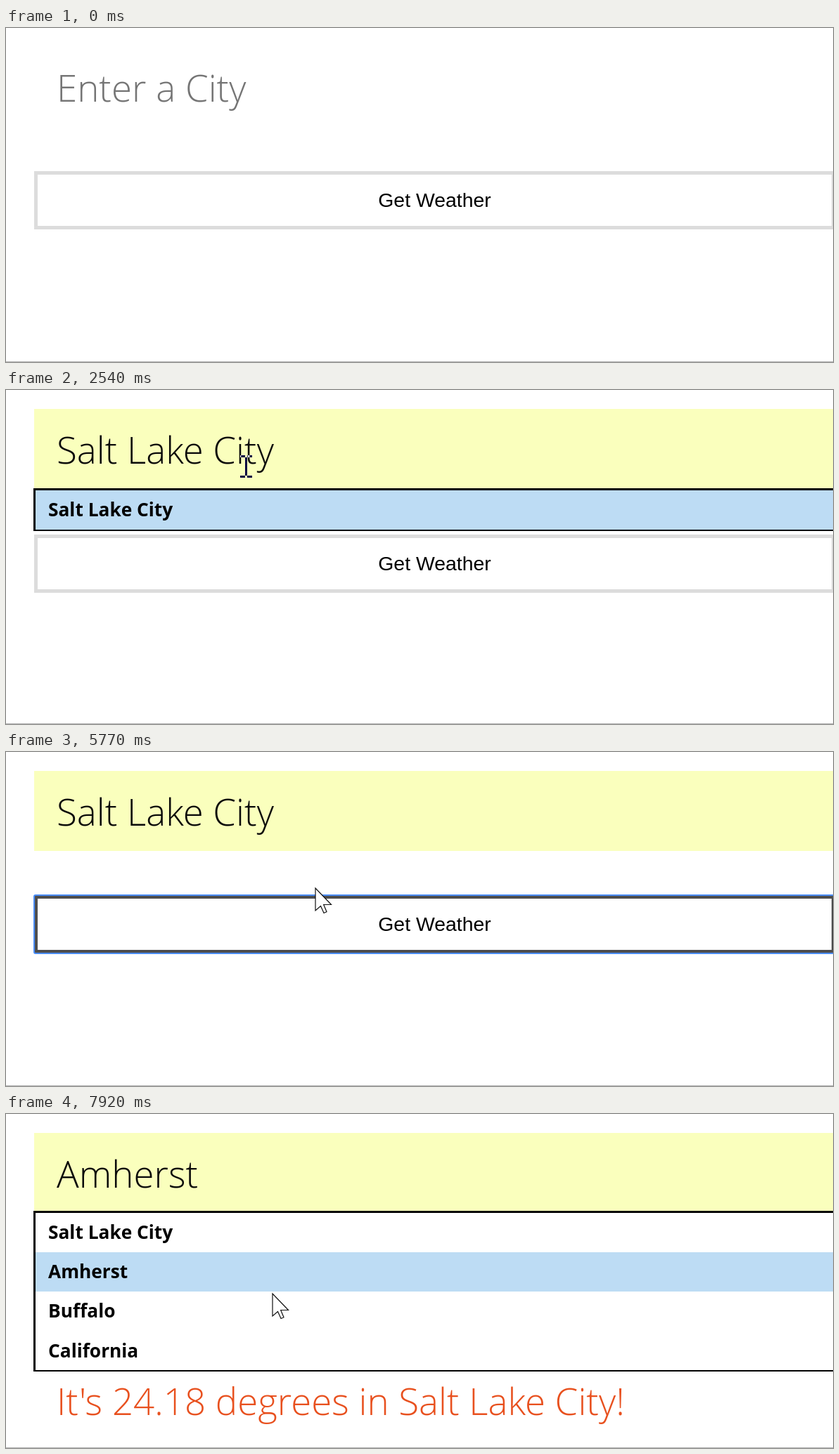
An HTML page for the animation above (7990 ms loop, 1176 px wide and 476 px high).

```html
<!DOCTYPE html>
<html lang="en">
<head>
<meta charset="utf-8">
<title>City weather form</title>
<style>
  html, body { margin: 0; width: 100%; height: 100%; overflow: hidden; background: #fff; }
  svg { display: block; isolation: isolate; }
  .large { font: 300 52.8px "Open Sans", sans-serif; }
  .row { font: 700 26.3px "Noto Sans", "Open Sans", sans-serif; }
  .label { font: 28.4px "Liberation Sans", Arial, sans-serif; text-anchor: middle; }
  #beam { fill: #fff; mix-blend-mode: difference; }
  #halo { fill: #fffd84; mix-blend-mode: multiply; }
</style>
</head>
<body>
<svg width="1176" height="476" viewBox="0 0 1176 476">
  <rect width="1176" height="476" fill="#fff"/>
  <rect y="475" width="1176" height="1" fill="#b4b4b4"/>
  <rect id="fill" x="40" y="27" width="1136" height="114" fill="#faffbd"/>
  <rect id="underline" x="40" y="141" width="1136" height="1.5" fill="#d4d4cc"/>
  <text id="field" class="large" x="72" y="105"></text>
  <rect id="caret" y="49" width="2" height="71" fill="#4b505c"/>
  <g id="button">
    <rect id="frame" x="42.5" y="206.5" width="1134" height="78" fill="#fff" stroke-width="5"/>
    <rect id="ring" x="40" y="204" width="1140" height="83" rx="2" fill="none" stroke="#4a8df8" stroke-width="2"/>
    <text class="label" x="609.5" y="255">Get Weather</text>
  </g>
  <text id="result" class="large" x="72" y="429" fill="#e8501e">It's 24.18 degrees in Salt Lake City!</text>
  <g id="list">
    <rect id="border" x="39" y="138" width="1137"/>
    <rect id="panel" x="42" y="141" width="1134" fill="#fff"/>
    <rect id="hover" x="42" width="1134" height="56" fill="#bddcf4"/>
    <g id="rows"></g>
  </g>
  <path id="arrow" d="M0 0V32L7.5 25.5L12 35.5L16 33.7L11.7 23.5H22.5Z" fill="#fff" stroke="#111" stroke-width="1.2"/>
  <path id="beam" d="M-5-14h7v3h-7zM5-14h7v3h-7zM2-11h3v26h-3zM-5 15h7v3h-7zM5 15h7v3h-7z"/>
  <circle id="halo" r="28"/>
</svg>
<script>
const LOOP = 7990;
const cities = ["Salt Lake City", "Amherst", "Buffalo", "California"];
const $ = id => document.getElementById(id);
const within = (t, a, b) => t >= a && t < b;
const show = (id, on) => $(id).style.display = on ? "" : "none";
const place = (id, x, y) => $(id).setAttribute("transform", `translate(${x} ${y})`);

// Pointer moves: start, last step, number of steps, destination
const moves = [
  [120, 750, 9, 338, 107],
  [4330, 4570, 4, 453, 228],
  [5450, 5520, 2, 448, 215],
  [5770, 5770, 1, 440, 194],
  [5840, 6450, 9, 385, 127],
  [7210, 7460, 4, 380, 212],
  [7690, 7920, 4, 379, 256]
];

function pointer(t) {
  let x = 425, y = 500;
  for (const [start, end, steps, toX, toY] of moves) {
    if (t < start) break;
    const done = steps < 2 ? 1 : Math.floor((t - start) / (end - start) * (steps - 1) + .001) + 1;
    const p = Math.min(1, done / steps);
    x += (toX - x) * p;
    y += (toY - y) * p;
  }
  return [Math.round(x), Math.round(y)];
}

// Field contents: start, text, kind
const contents = [
  [0, "Enter a City", "empty"],
  [1680, "S", "typed"],
  [1830, "Sa", "typed"],
  [2000, "Sal", "typed"],
  [2470, cities[0], "filled"],
  [5920, "Enter a City", "empty"],
  [7290, cities[0], "filled"],
  [7690, cities[1], "filled"]
];
const inks = { empty: "#757575", typed: "#4b505c", filled: "#0a0a0a" };

cities.forEach((city, i) => {
  const row = document.createElementNS("http://www.w3.org/2000/svg", "text");
  row.setAttribute("class", "row");
  row.setAttribute("x", 60);
  row.setAttribute("y", 178 + i * 56.2);
  row.textContent = city;
  $("rows").append(row);
});

function draw(t) {
  const [x, y] = pointer(t);
  const [, text, kind] = contents.findLast(c => t >= c[0]);
  const shift = within(t, 1680, 4740) ? 2 : 0;

  const field = $("field");
  field.textContent = text;
  field.setAttribute("fill", inks[kind]);
  show("fill", kind === "filled");
  show("underline", shift);

  const caretOn = within(t, 1050, 1510) || within(t, 1680, 2470) || within(t, 2770, 3320)
    || within(t, 3870, 4410) || within(t, 6750, 7290);
  show("caret", caretOn);
  $("caret").setAttribute("x", 71.5 + (kind === "empty" ? 0 : field.getComputedTextLength() - .5));

  const focused = within(t, 4820, 5920);
  const hot = focused || within(y, 205 + shift, 287 + shift) && t < 6000;
  place("button", 0, shift);
  $("frame").setAttribute("stroke", hot ? "#4d4d4d" : "#dcdcdc");
  show("ring", focused);
  show("result", t >= 5920);

  const open = within(t, 1050, 2770) || t >= 6750;
  const single = within(t, 1680, 2770);
  const height = single ? 61 : 229;
  show("list", open);
  place("list", 0, shift);
  $("border").setAttribute("height", height);
  $("panel").setAttribute("height", height - 5);
  [...$("rows").children].forEach((row, i) => row.style.display = single && i ? "none" : "");
  const active = t >= 7460 ? 1 : 0;
  show("hover", within(t, 2470, 2770) || t >= 7290);
  $("hover").setAttribute("y", 141 + active * 56);

  const overField = y < 140;
  show("beam", overField);
  show("arrow", !overField);
  show("halo", within(t, 900, 1130) || within(t, 4740, 4900) || within(t, 6680, 6830));
  for (const id of ["beam", "arrow", "halo"]) place(id, x, y);
}

const began = performance.now();
function tick() {
  draw((performance.now() - began) % LOOP);
  requestAnimationFrame(tick);
}
tick();
</script>
</body>
</html>
```
